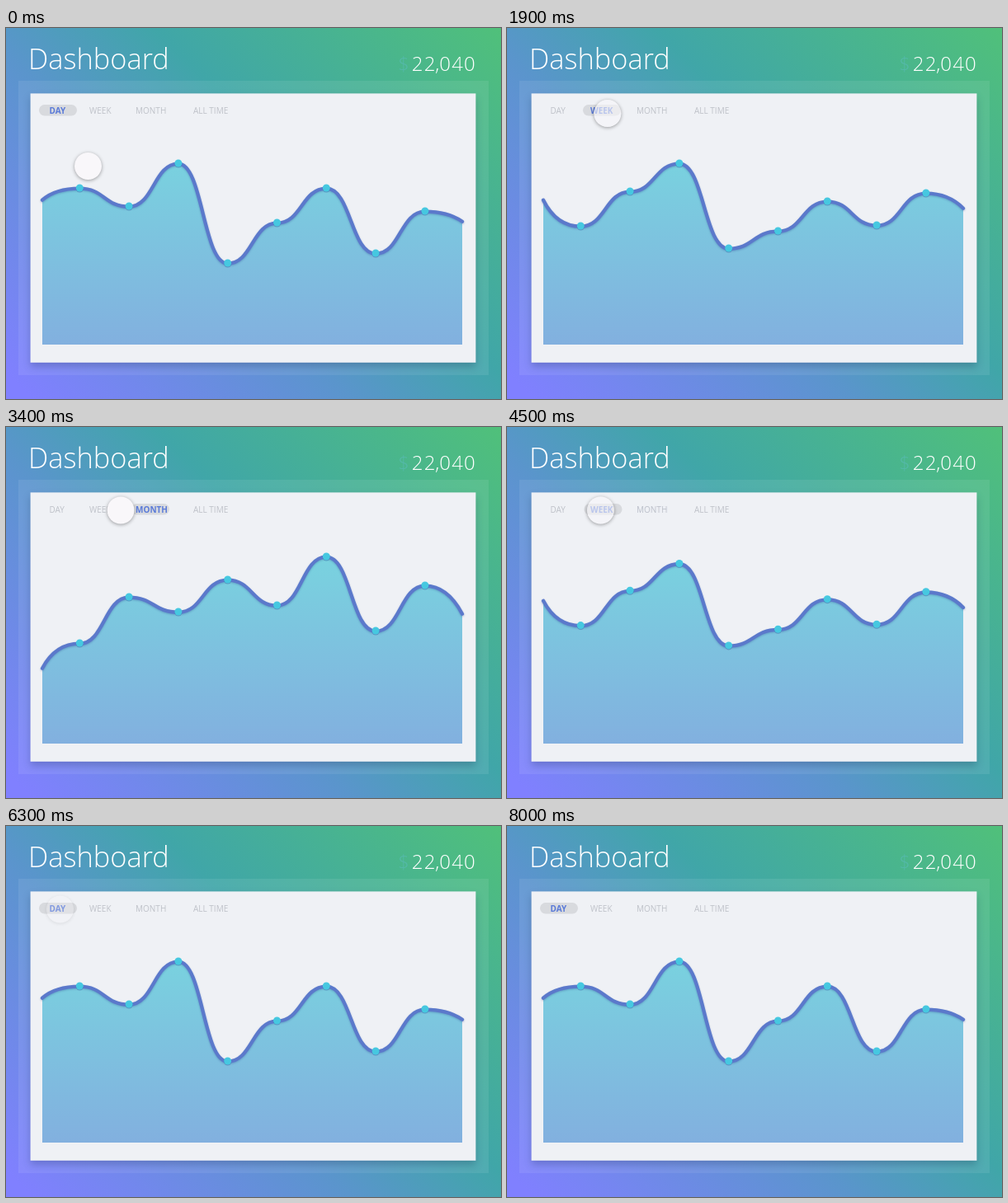
An HTML page that plays this animation: 600 by 450 pixels, repeating every 8100 ms.

```html
<!DOCTYPE html>
<html lang="en">
<head>
<meta charset="utf-8">
<title>Dashboard</title>
<style>
html, body { margin: 0; width: 100%; height: 100%; overflow: hidden; }
body { position: relative; background: linear-gradient(45deg, #8080ff 3%, #5a95cc 40%, #40a6a8 60%, #50c07a 100%); }
svg { position: absolute; left: 0; top: 0; }
text { font-family: "Open Sans", "Noto Sans", sans-serif; }
.big { font-weight: 300; fill: #fff; }
.card { fill: #eff1f5; filter: drop-shadow(0 5px 5px rgba(0,20,60,.22)); }
.tab { font-size: 10px; fill: #bfc2c9; }
.on { font-weight: 700; fill: #5b7bd8; }
#line { fill: none; stroke: #5b79cb; stroke-width: 4.3; stroke-linecap: round; filter: drop-shadow(0 1px 1px rgba(50,80,150,.35)); }
#dots circle { fill: #46c8e0; filter: drop-shadow(0 1px .5px rgba(50,90,160,.4)); }
#cursor { position: absolute; left: -16.5px; top: -16.5px; width: 33px; height: 33px; border-radius: 50%; box-shadow: 0 1px 4px rgba(0,0,0,.36); }
</style>
</head>
<body>
<svg width="600" height="450">
  <defs>
    <linearGradient id="fill" gradientUnits="userSpaceOnUse" x1="0" y1="160" x2="0" y2="384">
      <stop stop-color="#79d2df"/><stop offset="1" stop-color="#82b0df"/>
    </linearGradient>
  </defs>
  <rect x="15" y="64" width="570" height="357" fill="#fff" opacity=".08"/>
  <rect class="card" x="29.6" y="79.4" width="539.8" height="326.4"/>
  <text class="big" x="27" y="50" font-size="34.4">Dashboard</text>
  <text class="big" x="475" y="52" font-size="24" style="fill:#54b9a8">$</text>
  <text class="big" x="570" y="52" font-size="24" letter-spacing="1.2" text-anchor="end">22<tspan dx="-1.5">,</tspan><tspan dx="-1.2">040</tspan></text>
  <rect id="pill" y="93" width="46" height="13.5" rx="6.75" fill="#d8dade"/>
  <g id="tabs"></g>
  <path id="area" fill="url(#fill)"/>
  <path id="line" transform="translate(0 .7)"/>
  <g id="dots"></g>
</svg>
<div id="cursor"></div>
<script>
const $ = id => document.getElementById(id);
const LOOP = 8100, STEP = 100;
const FIRST = 920, GAP = 1383, MORPH = 1000, TRAVEL = 600;
const LEFT = 44, RIGHT = 553, BASE = 384;
const dotX = i => 89.3 + 59.8 * i;

const tabs = [
  { name: 'DAY', x: 52.5, pill: 40, ys: [208, 194, 216, 164, 285, 236, 194, 273, 222, 234] },
  { name: 'WEEK', x: 101, pill: 92, ys: [208, 240, 198, 164, 267, 246, 210, 239, 200, 218] },
  { name: 'MONTH', x: 157, pill: 152, ys: [292, 262, 206, 224, 185, 216, 157, 247, 192, 226] },
  { name: 'ALL TIME', x: 227 }
];
// Where the cursor rests first, then each press, evenly spaced in time
const stops = [
  { tab: 0, x: 99, y: 167 },
  { tab: 1, x: 113, y: 103.5 },
  { tab: 2, x: 172, y: 100.5 },
  { tab: 1, x: 113, y: 100.5 },
  { tab: 0, x: 65, y: 100.5 }
];

const mix = (a, b, k) => a + (b - a) * k;
const ramp = (t, start, length) => Math.min(1, Math.max(0, (t - start) / length));
const ease = k => k < .5 ? 4 * k ** 3 : 1 - 4 * (1 - k) ** 3;
const pressTime = i => FIRST + GAP * (i - 1);

function add(parent, tag, attrs, text = '') {
  const el = document.createElementNS('http://www.w3.org/2000/svg', tag);
  for (const name in attrs) el.setAttribute(name, attrs[name]);
  el.textContent = text;
  return parent.appendChild(el);
}

for (const tab of tabs) {
  const at = { x: tab.x, y: 103.6 };
  tab.off = add($('tabs'), 'text', { ...at, class: 'tab' }, tab.name);
  tab.on = add($('tabs'), 'text', { ...at, class: 'tab on' }, tab.name);
}
const dots = Array.from({ length: 8 }, (_, i) => add($('dots'), 'circle', { cx: dotX(i), r: 4.5 }));

function curve([first, ...ys]) {
  const last = ys.pop();
  let d = `M${LEFT} ${first}Q60 ${ys[0]} ${dotX(0)} ${ys[0]}`;
  for (let i = 1; i < ys.length; i++) {
    const mid = dotX(i - .5);
    d += `C${mid} ${ys[i - 1]} ${mid} ${ys[i]} ${dotX(i)} ${ys[i]}`;
  }
  return d + `Q535 ${ys[7]} ${RIGHT} ${last}`;
}

function draw(t) {
  let from = 0, to = 0, k = 1;
  let { x, y } = stops[0], press = 0;
  for (let i = 1; i < stops.length; i++) {
    const stop = stops[i], start = pressTime(i);
    const go = ease(ramp(t, start - TRAVEL, TRAVEL));
    x = mix(x, stop.x, go);
    y = mix(y, stop.y, go);
    press += ramp(t, start - 100, 200) - ramp(t, start + 980, 110);
    if (t >= start) {
      from = to;
      to = stop.tab;
      k = ease(ramp(t, start, MORPH));
    }
  }

  const a = tabs[from], b = tabs[to];
  const ys = a.ys.map((v, i) => mix(v, b.ys[i], k));
  const d = curve(ys);
  $('line').setAttribute('d', d);
  $('area').setAttribute('d', `${d}V${BASE}H${LEFT}Z`);
  dots.forEach((dot, i) => dot.setAttribute('cy', ys[i + 1]));
  $('pill').setAttribute('x', mix(a.pill, b.pill, k));
  tabs.forEach((tab, i) => {
    const on = i === to ? k : i === from ? 1 - k : 0;
    tab.on.setAttribute('opacity', on);
    tab.off.setAttribute('opacity', 1 - on);
  });

  const cursor = $('cursor').style;
  cursor.transform = `translate(${x}px,${y}px)`;
  cursor.background = `rgba(249,247,250,${1 - .4 * press})`;
  cursor.opacity = 1 - ramp(t, 6000, 400);
}

const begin = performance.now();
function tick() {
  const t = (performance.now() - begin) % LOOP;
  draw(Math.floor(t / STEP) * STEP);
  requestAnimationFrame(tick);
}
tick();
</script>
</body>
</html>
```
